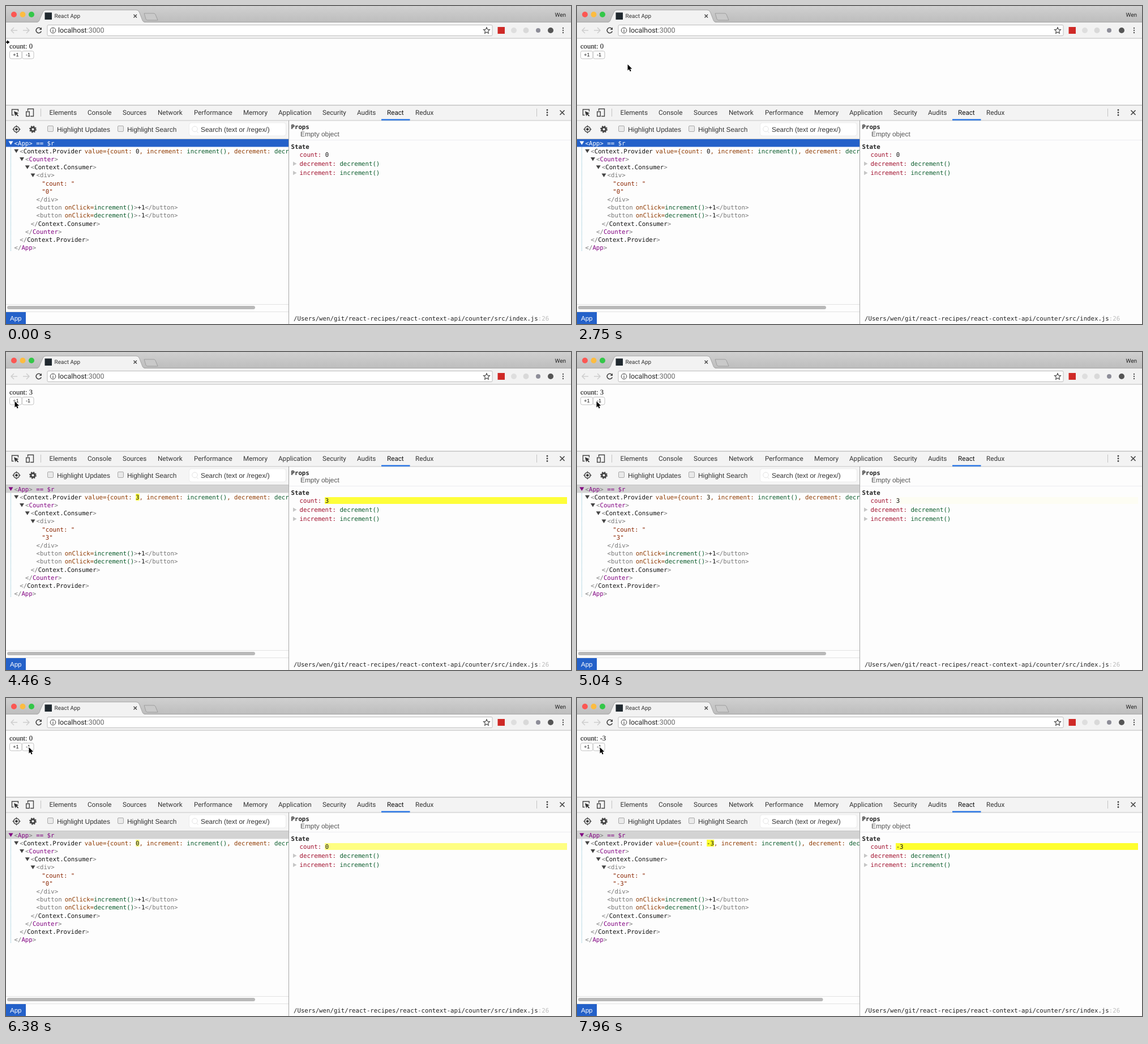
Write an HTML page that moves like this. It is 998 px wide and 561 px high and loops after 8 s.

```html
<!DOCTYPE html>
<html lang="en">
<head>
<meta charset="utf-8">
<title>Counter with devtools</title>
<style>
  html, body { margin: 0; width: 100%; height: 100%; overflow: hidden; background: #fdfdfd; }
  svg { display: block; width: 100%; height: 100%; }
  text { text-rendering: geometricPrecision; white-space: pre; }
  .ui { font: 11.7px Roboto, sans-serif; fill: #333; }
  .small { font-size: 10px; }
  .url { font-size: 12.4px; }
  .sans { font: 11.9px "Liberation Sans", Arial, sans-serif; fill: #333; }
  .mono { font: 10.71px "DejaVu Sans Mono", monospace; fill: #222; }
  .page { font: 12.6px "Liberation Serif", serif; fill: #000; }
  .btn { font: 9px "Liberation Sans", Arial, sans-serif; fill: #111; text-anchor: middle; }
  .bold { font-weight: bold; }
  .tag { fill: #777; }
  .comp { fill: #800080; }
  .attr { fill: #8f3a00; }
  .str { fill: #8b2500; }
  .fn { fill: #0b5c2c; }
  .key { fill: #a00f2c; }
  .num { fill: #111; }
  .focused, .focused tspan { fill: #fff; }
  .line { fill: none; stroke: #444; stroke-width: 1.4; }
  .thin { fill: none; stroke: #c4c4c4; stroke-width: 1; }
</style>
</head>
<body>
<svg viewBox="0 0 998 561" preserveAspectRatio="none">
  <defs>
    <linearGradient id="strip" x2="0" y2="1"><stop stop-color="#d0d0d0"/><stop offset="1" stop-color="#bdbdbd"/></linearGradient>
    <linearGradient id="pressed" x2="0" y2="1"><stop stop-color="#4a90fb"/><stop offset="1" stop-color="#1160ea"/></linearGradient>
    <clipPath id="left"><path d="M0 203H499V561H0z"/></clipPath>
  </defs>

  <!-- browser window -->
  <rect width="998" height="29" fill="url(#strip)"/>
  <rect y="28.5" width="998" height="29" fill="#f2f2f2"/>
  <path d="M0 28.5H998" stroke="#a5a5a5"/>
  <path d="M54 29C59 28 59 25 61 20L65 11Q66.500 7 70 7H230Q234 7 235.500 11L239 20C241 25 241 28 246 29z" fill="#f2f2f2"/>
  <path d="M54 28.500C59 28 59 25 61 20L65 11Q66.500 7 70 7H230Q234 7 235.500 11L239 20C241 25 241 28 246 28.500" fill="none" stroke="#999" stroke-width=".8"/>
  <path d="M244 13H261Q263 13 264 15L268 25H250Q248 25 247 23z" fill="#c9c9c9" stroke="#999" stroke-width=".9"/>
  <circle cx="14" cy="15" r="5" fill="#fc5753"/>
  <circle cx="29.500" cy="15" r="5" fill="#fdbc40"/>
  <circle cx="45" cy="15" r="5" fill="#33c748"/>
  <rect x="68.500" y="11.500" width="12.500" height="12.500" fill="#20292f"/>
  <text class="ui small" x="85.500" y="21">React App</text>
  <path class="line" d="M225.500 15l5.500 5.500m0-5.500l-5.500 5.500" stroke-width="1.2"/>
  <text class="ui small" x="989" y="19" text-anchor="end" style="fill:#222">Wen</text>
  <path d="M20 43H9m5-5l-5 5 5 5M30 43H41m-5-5l5 5-5 5" fill="none" stroke="#cecece" stroke-width="1.5"/>
  <path d="M61.500 40A4.700 4.700 0 1 0 62.300 44.500" fill="none" stroke="#444" stroke-width="1.600"/>
  <path d="M63 37.500V42H58.500z" fill="#444"/>
  <rect x="73" y="33.500" width="786" height="19" rx="2" fill="#fff" stroke="#bcbcbc"/>
  <circle class="line" cx="83" cy="43" r="4.800" style="stroke-width:1"/>
  <path d="M83 42.300V46M83 39.800V41" stroke="#444" stroke-width="1.200"/>
  <text class="ui url" x="92" y="47"><tspan fill="#222">localhost</tspan><tspan fill="#666">:3000</tspan></text>
  <path class="line" style="stroke-width:1.100" d="M849 37.700l1.600 3.600 3.900.4-2.900 2.600.8 3.900-3.400-2-3.400 2 .8-3.900-2.900-2.600 3.900-.4z"/>
  <rect x="868.500" y="37" width="12.500" height="12" fill="#cf2a27"/>
  <circle cx="897" cy="43" r="5" fill="#dedede"/>
  <circle cx="918.500" cy="43" r="5" fill="#d9d9d9"/>
  <circle cx="940" cy="43" r="4" fill="#8d8d98"/>
  <circle cx="962" cy="43" r="5" fill="#555"/>
  <path d="M0 57H998" stroke="#bdbdbd"/>
  <g fill="#555"><circle cx="984" cy="39" r="1.200"/><circle cx="984" cy="43" r="1.200"/><circle cx="984" cy="47" r="1.200"/></g>

  <!-- page -->
  <text class="page" x="6" y="75">count: <tspan class="value"></tspan></text>
  <rect id="plus" x="6.500" y="79.500" width="21.500" height="13.500" rx="2.800"/>
  <rect id="minus" x="28.500" y="79.500" width="20.500" height="13.500" rx="2.800"/>
  <text class="btn" x="17.300" y="89.300">+1</text>
  <text class="btn" x="39" y="89.300">-1</text>

  <!-- devtools bars -->
  <rect y="175" width="998" height="27" fill="#f3f3f3"/>
  <rect y="202" width="499" height="32.500" fill="#f5f5f5"/>
  <path d="M0 175H998" stroke="#a8a8a8"/>
  <path class="thin" d="M0 202H998M0 234.500H499M61.500 181V195M937.500 181V195"/>
  <path class="line" d="M13.500 192.500H10.500V182.500H21.500V186"/>
  <path d="M14 185.500l8.500 3.500-3.300 1.300 3 3.200-1.200 1.200-3.200-3.200-1.400 3z" fill="#333"/>
  <path class="line" d="M38.500 185V181.500H48.500V194.500H43M35.700 186.500H41.300V194.500H35.700z"/>
  <g id="tabs"></g>
  <rect x="663" y="199.500" width="50.500" height="2.300" fill="#1f6fe5"/>
  <g fill="#444"><circle cx="956" cy="183.500" r="1.400"/><circle cx="956" cy="188" r="1.400"/><circle cx="956" cy="192.500" r="1.400"/></g>
  <path class="line" d="M978.500 184l8 8m0-8l-8 8" style="stroke-width:1.700"/>
  <circle class="line" cx="18.500" cy="217.500" r="5"/>
  <circle cx="18.500" cy="217.500" r="2.300" fill="#333"/>
  <path class="line" d="M18.500 210.500v3m0 8v3M11.500 217.500h3m8 0h3"/>
  <circle cx="47.500" cy="217.500" r="3.600" fill="none" stroke="#444" stroke-width="3"/>
  <circle cx="47.500" cy="217.500" r="5.200" fill="none" stroke="#444" stroke-width="2.400" stroke-dasharray="2.042"/>
  <g fill="#e9e9e9" stroke="#aaa"><rect x="73.500" y="211.500" width="10" height="10" rx="1.500"/><rect x="197.500" y="211.500" width="10" height="10" rx="1.500"/></g>
  <text class="sans" x="90" y="222">Highlight Updates</text>
  <text class="sans" x="214" y="222">Highlight Search</text>
  <rect x="323.500" y="206" width="171" height="23" rx="4" fill="#fff" stroke="#ececec"/>
  <circle cx="333.500" cy="217" r="4.800" fill="none" stroke="#e2e2e2"/>
  <path d="M337 221l2.500 3" stroke="#e2e2e2"/>
  <text class="sans" x="344" y="222">Search (text or /regex/)</text>

  <!-- component tree -->
  <g clip-path="url(#left)">
    <rect id="selection" y="235" width="499" height="13.500"/>
    <path d="M8.500 249V433" stroke="#7fbdd0" stroke-dasharray="1 1"/>
    <rect class="flash" x="229.200" y="250" height="12" id="treeFlash"/>
    <g id="tree"></g>
  </g>
  <path class="thin" d="M0 526.500H499M0 539.500H499" style="stroke:#e2e2e2"/>
  <rect id="thumb" x="2" y="529" height="6" rx="3" fill="#b9b9b9"/>
  <rect y="540" width="35" height="21" fill="#2461c9"/>
  <text class="sans" x="7" y="554.500" style="font-size:11.500px;fill:#fff">App</text>

  <!-- inspector -->
  <path d="M499.500 202V561" stroke="#a6a6a6"/>
  <path d="M500 236.500H998" stroke="#ececf0"/>
  <rect class="flash" x="563" y="256" width="428" height="12"/>
  <text class="mono bold" x="503.500" y="216.500">Props</text>
  <text class="sans" x="520" y="230" font-style="italic" style="fill:#555">Empty object</text>
  <text class="mono bold" x="503.500" y="251.500">State</text>
  <text class="mono" x="518.500" y="265.700"><tspan class="key">count:</tspan> <tspan class="value num"></tspan></text>
  <text class="mono" x="518.500" y="282"><tspan class="key">decrement:</tspan> <tspan class="fn">decrement()</tspan></text>
  <text class="mono" x="518.500" y="298.300"><tspan class="key">increment:</tspan> <tspan class="fn">increment()</tspan></text>
  <path d="M507 274.500l6.500 3.700-6.500 3.700zM507 290.800l6.500 3.700-6.500 3.700z" fill="#c6c6c6"/>
  <text class="mono" x="508" y="554.700">/Users/wen/git/react-recipes/react-context-api/counter/src/index.js<tspan fill="#bbb">:26</tspan></text>

  <path id="edge" d="M-2 62.700H2V60.200L6.500 63.700L2 67.200V64.700H-2z" stroke="#fff" stroke-width="1" paint-order="stroke"/>
  <path id="arrow" d="M0 0V10.800L2.500 8.500L4.200 12.600L6.100 11.800L4.400 7.800H7.700z" stroke="#fff" stroke-width="1.400" paint-order="stroke"/>
</svg>
<script>
const LOOP = 8000, BLUR_AT = 3790, CHAR = 6.447;
const $ = id => document.getElementById(id);
const all = sel => [...document.querySelectorAll(sel)];

const tabs = { Elements: 76.5, Console: 144, Sources: 206, Network: 268, Performance: 332, Memory: 419,
  Application: 481, Security: 559, Audits: 620, React: 673, Redux: 723 };
$('tabs').innerHTML = Object.entries(tabs).map(([name, x]) =>
  `<text class="ui" x="${x}" y="192"${name === 'React' ? ' style="fill:#111"' : ''}>${name}</text>`).join('');

const span = (cls, text, dx = 0) => `<tspan class="${cls}" dx="${dx}">${text}</tspan>`;
const open = (cls, name, rest = '') => span('tag', '&lt;') + span(cls, name) + rest + span('tag', '&gt;');
const close = (cls, name) => span('tag', '&lt;/') + span(cls, name) + span('tag', '&gt;');
const button = (fn, label) => open('tag', 'button', span('attr', 'onClick=', 5) + span('fn', fn + '()')) +
  span('num', label) + close('tag', 'button');
const provider = span('tag', '&lt;') + span('num', 'Context.Provider') + span('attr', 'value={count: ', 5) +
  span('value num', '') + span('attr', ', increment: ') + span('fn', 'increment()') +
  span('attr', ', decrement: ') + span('fn', 'decrement()') + span('attr', '}');

// depth, content, expandable
const rows = [
  [0, open('comp', 'App') + span('comp', ' == $r'), true],
  [1, provider, true],
  [2, open('comp', 'Counter'), true],
  [3, open('num', 'Context.Consumer'), true],
  [4, open('tag', 'div'), true],
  [5, span('str', '"count: "')],
  [5, span('str', '"') + span('value str', '') + span('str', '"')],
  [4, close('tag', 'div')],
  [4, button('increment', '+1')],
  [4, button('decrement', '-1')],
  [3, close('num', 'Context.Consumer')],
  [2, close('comp', 'Counter')],
  [1, close('num', 'Context.Provider')],
  [0, close('comp', 'App')],
];
$('tree').innerHTML = rows.map(([depth, content, expandable], i) => {
  const x = 14.5 + depth * 9.75, y = 245.5 + i * 14.22;
  const arrow = expandable ? `<path d="M${x - 10} ${y - 7}h8l-4 6.500z" fill="#444"/>` : '';
  return `<g>${arrow}<text class="mono" x="${x}" y="${y}">${content}</text></g>`;
}).join('');
const appText = $('tree').querySelector('text'), appArrow = $('tree').querySelector('path');

// press, release, resulting count
const clicks = [
  [3790, 3880, 1], [4010, 4080, 2], [4210, 4290, 3],
  [5560, 5650, 2], [5780, 5860, 1], [6000, 6080, 0],
  [7290, 7440, -1], [7560, 7640, -2], [7730, 7810, -3],
];
// time, x, y
const path = [
  [1250, 2, 62], [1330, 10, 64], [1420, 16, 65], [1540, 7, 58],
  [2250, 7, 58], [2400, 40, 70], [2560, 88, 90], [2650, 95, 99], [2750, 89.500, 103],
  [3040, 89.500, 103], [3180, 66, 112], [3320, 30, 107], [3420, 8, 94], [3580, 15.500, 87],
  [4630, 15.500, 87], [4760, 25, 88], [4900, 34.500, 87],
  [5540, 34.500, 87], [5660, 40.500, 87],
];

function pointer(t) {
  const i = path.findIndex(p => p[0] > t);
  if (i === 0) return path[0].slice(1);
  if (i < 0) return path[path.length - 1].slice(1);
  const [t0, x0, y0] = path[i - 1], [t1, x1, y1] = path[i];
  const k = (t - t0) / (t1 - t0);
  return [x0 + (x1 - x0) * k, y0 + (y1 - y0) * k];
}

// CSS "ease", solved by bisection
function ease(x) {
  if (x >= 1) return 1;
  const bezier = (s, a, b) => 3 * s * (1 - s) ** 2 * a + 3 * s * s * (1 - s) * b + s ** 3;
  let lo = 0, hi = 1;
  for (let i = 0; i < 20; i++) {
    const mid = (lo + hi) / 2;
    if (bezier(mid, .25, .25) < x) lo = mid; else hi = mid;
  }
  return bezier(lo, .1, 1);
}

const values = all('.value'), flashes = all('.flash');
flashes.forEach(f => f.setAttribute('fill', '#ff0'));

function paintButton(el, down) {
  el.setAttribute('fill', down ? 'url(#pressed)' : '#fff');
  el.setAttribute('stroke', down ? '#1c5fd8' : '#c2c2c2');
}

function draw(t) {
  const done = clicks.filter(c => c[1] <= t).pop();
  const count = String(done ? done[2] : 0);
  values.forEach(v => { if (v.textContent !== count) v.textContent = count; });
  const glow = done ? 1 - ease((t - done[1]) / 1000) : 0;
  flashes.forEach(f => f.setAttribute('opacity', glow));
  $('treeFlash').setAttribute('width', count.length * CHAR);
  $('thumb').setAttribute('width', count.length > 1 ? 432.5 : 438);

  const held = clicks.findIndex(c => c[0] <= t && t < c[1]);
  paintButton($('plus'), held >= 0 && held < 3);
  paintButton($('minus'), held >= 3);

  const focused = t < BLUR_AT;
  $('selection').setAttribute('fill', focused ? '#2461c9' : '#d3d3d3');
  appText.classList.toggle('focused', focused);
  appArrow.setAttribute('fill', focused ? '#fff' : '#800080');

  const atEdge = t < path[0][0];
  $('edge').style.display = atEdge ? '' : 'none';
  $('arrow').style.display = atEdge ? 'none' : '';
  $('arrow').setAttribute('transform', `translate(${pointer(t)})`);
}

const start = performance.now();
function tick() {
  draw((performance.now() - start) % LOOP);
  requestAnimationFrame(tick);
}
tick();
</script>
</body>
</html>
```
